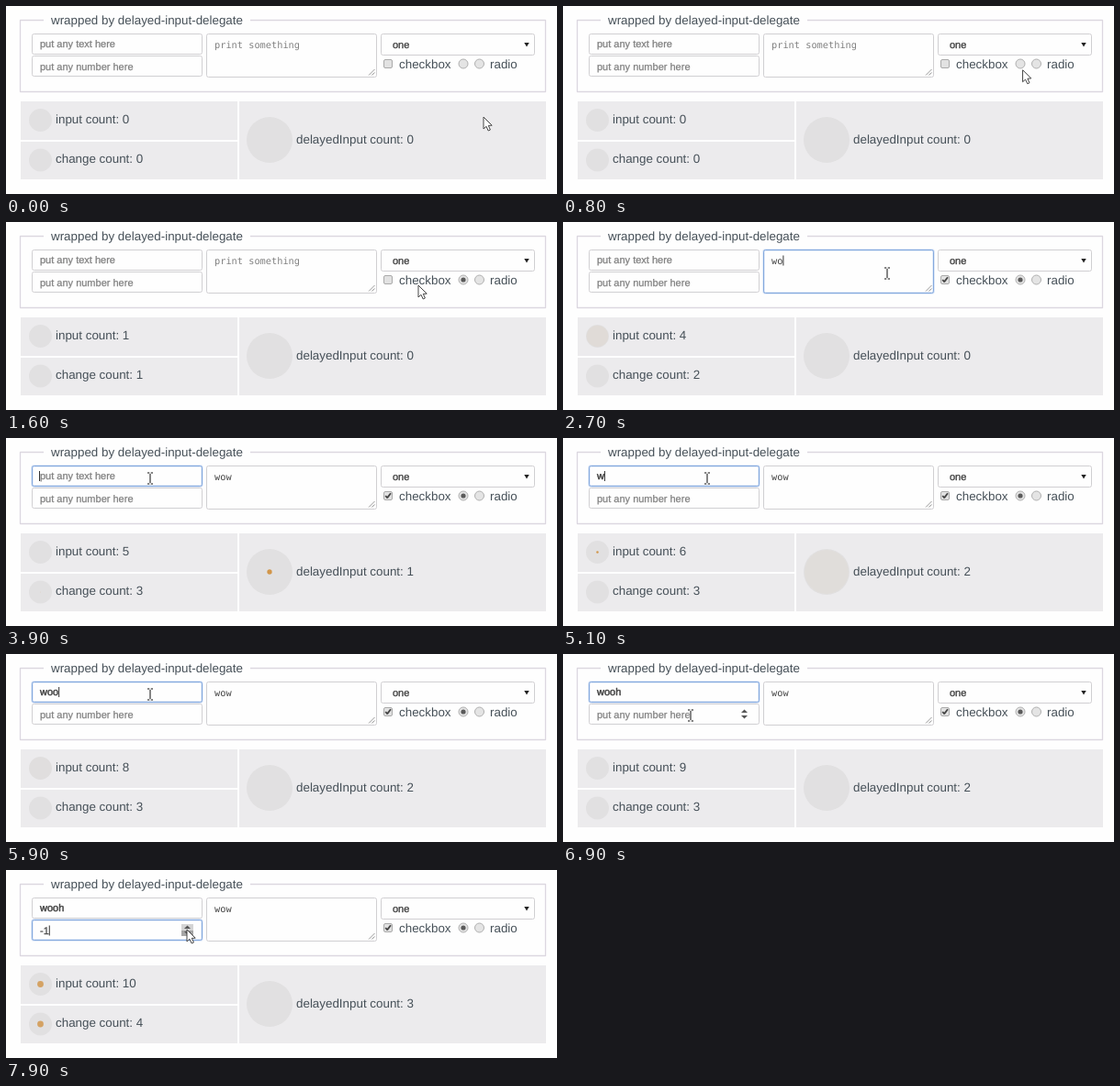
An HTML page with a canvas that plays this animation: 600x205 px, repeating every 8000 ms.

```html
<!DOCTYPE html>
<html lang="en">
<head>
<meta charset="utf-8">
<title>Delayed input delegate</title>
<style>
html, body { margin: 0; width: 100%; height: 100%; overflow: hidden; background: #fefefe; }
canvas { display: block; width: 600px; height: 205px; }
</style>
</head>
<body>
<canvas id="stage"></canvas>
<script>
const LOOP = 8000, W = 600, H = 205;
const SANS = '"Liberation Sans", Arial, sans-serif';
const MONO = '"DejaVu Sans Mono", monospace';
const LABEL = '13.38px ' + SANS, FIELD = '11px ' + SANS, CODE = '10.3px ' + MONO;
const INK = '#465058', HINT = '#808080', TYPED = '#444';

const canvas = document.getElementById('stage');
const ctx = canvas.getContext('2d');
const dpr = window.devicePixelRatio || 1;
canvas.width = W * dpr;
canvas.height = H * dpr;

// Event times in ms
const RADIO = 1080, CHECK = 1850, SPIN = 7825;
const AREA_KEYS = [2230, 2420, 2850];
const TEXT_KEYS = [5060, 5300, 5560, 5950];
const AREA_FOCUS = 2130, TEXT_FOCUS = 3890;
const inputs = [RADIO, CHECK, ...AREA_KEYS, ...TEXT_KEYS, SPIN];
const changes = [RADIO, CHECK, TEXT_FOCUS, SPIN];
const delayed = [3858, 4800, 6960];

// Pointer path: time, x, y
const path = [
  [0, 520, 121], [250, 520, 121], [950, 498, 63], [1200, 498, 63],
  [1600, 449, 69], [1800, 416, 63], [1920, 416, 63], [2110, 353, 56],
  [3250, 353, 56], [3750, 157, 44], [6350, 157, 44], [6750, 139, 67],
  [6980, 139, 67], [7500, 197, 65], [8000, 197, 65]
];

const past = (times, t) => times.filter(x => x <= t);
const smooth = p => p * p * (3 - 2 * p);

function pointer(t) {
  const i = Math.max(1, path.findIndex(k => k[0] > t));
  const [t0, x0, y0] = path[i - 1], [t1, x1, y1] = path[i];
  const p = smooth((t - t0) / (t1 - t0));
  return [x0 + (x1 - x0) * p, y0 + (y1 - y0) * p];
}

function ease(p) {
  // cubic-bezier(.25, .1, .25, 1)
  const curve = (u, a, b) => 3 * u * (1 - u) * (1 - u) * a + 3 * u * u * (1 - u) * b + u * u * u;
  let lo = 0, hi = 1;
  for (let i = 0; i < 16; i++) {
    const mid = (lo + hi) / 2;
    if (curve(mid, 0.25, 0.25) < p) lo = mid; else hi = mid;
  }
  return curve(lo, 0.1, 1);
}

function text(str, x, y, font, color, weight) {
  ctx.font = font;
  ctx.fillStyle = color;
  ctx.fillText(str, x, y);
  if (weight) {
    ctx.strokeStyle = color;
    ctx.lineWidth = weight;
    ctx.strokeText(str, x, y);
  }
  return ctx.measureText(str).width;
}

function poly(points, fill, stroke, width = 1) {
  ctx.beginPath();
  points.forEach(([x, y]) => ctx.lineTo(x, y));
  ctx.closePath();
  if (fill) { ctx.fillStyle = fill; ctx.fill(); }
  if (stroke) { ctx.strokeStyle = stroke; ctx.lineWidth = width; ctx.stroke(); }
}

function disc(x, y, r, fill, stroke) {
  ctx.beginPath();
  ctx.arc(x, y, r, 0, Math.PI * 2);
  ctx.fillStyle = fill;
  ctx.fill();
  if (stroke) { ctx.strokeStyle = stroke; ctx.lineWidth = 1; ctx.stroke(); }
}

function line(x0, y0, x1, y1, color, width = 1) {
  ctx.beginPath();
  ctx.moveTo(x0, y0);
  ctx.lineTo(x1, y1);
  ctx.strokeStyle = color;
  ctx.lineWidth = width;
  ctx.stroke();
}

function box(x, y, w, h, focused) {
  ctx.beginPath();
  ctx.roundRect(x + 0.5, y + 0.5, w - 1, h - 1, 2);
  ctx.fillStyle = '#fefefe';
  ctx.fill();
  if (focused) {
    ctx.strokeStyle = 'rgba(130,170,230,.3)';
    ctx.lineWidth = 2.4;
    ctx.stroke();
  }
  ctx.strokeStyle = focused ? '#84a9dd' : '#d0cfd2';
  ctx.lineWidth = 1;
  ctx.stroke();
}

function caret(x, y, since) {
  if (since % 1000 < 500) line(x + 0.5, y - 9, x + 0.5, y + 2, '#333');
}

function panel(x, y, w, h) {
  ctx.fillStyle = '#ecebed';
  ctx.fillRect(x, y, w, h);
}

function counter(name, times, t, x, y, r, textX, baseline) {
  const fired = past(times, t);
  disc(x, y, r, '#e1e0e1');
  const p = fired.length ? (t - fired[fired.length - 1]) / 400 : 1;
  if (p < 1) {
    const s = ease(p);
    ctx.globalAlpha = Math.min(1, 1.15 * (1 - s));
    disc(x, y, r * s, '#d2964a');
    ctx.globalAlpha = 1;
  }
  text(name + ' count: ' + fired.length, textX, baseline, LABEL, INK);
}

function spinner(pressed) {
  if (pressed) {
    ctx.fillStyle = '#d4d4d4';
    ctx.fillRect(191, 59, 13, 13);
    ctx.fillStyle = '#a6a6a6';
    ctx.fillRect(191, 66, 13, 6);
  }
  poly([[194, 64], [197.5, 60.5], [201, 64]], '#555');
  poly([[194, 67], [197.5, 70.5], [201, 67]], '#555');
}

function drawPointer(x, y) {
  const inField = y > 30 && y < 77 && (x > 28 && x < 190 || x > 218 && x < 403);
  if (inField) {
    const beam = (color, w) => {
      line(x, y - 5, x, y + 5, color, w);
      [-6, 6].forEach(d => {
        line(x - 3, y + d, x - 0.7, y + d, color, w);
        line(x + 0.7, y + d, x + 3, y + d, color, w);
      });
    };
    beam('#fff', 2.6);
    beam('#333', 1.2);
    return;
  }
  const shape = [[0, 0], [0, 13], [3, 10.3], [5.2, 15], [7.4, 14], [5.3, 9.4], [9.2, 9.2]];
  poly(shape.map(([a, b]) => [x + a, y + b]), '#fff', '#444');
}

function fieldset() {
  ctx.beginPath();
  ctx.moveTo(41, 15.5);
  ctx.lineTo(15.5, 15.5);
  ctx.lineTo(15.5, 93.5);
  ctx.lineTo(587.5, 93.5);
  ctx.lineTo(587.5, 15.5);
  ctx.lineTo(266, 15.5);
  ctx.strokeStyle = '#dcd7e0';
  ctx.lineWidth = 1.3;
  ctx.stroke();
  text('wrapped by delayed-input-delegate', 49, 20, LABEL, INK);
}

function form(t, mx, my) {
  const areaOn = t >= AREA_FOCUS && t < TEXT_FOCUS;
  const textOn = t >= TEXT_FOCUS && t < SPIN;
  const numOn = t >= SPIN;
  const typed = 'wooh'.slice(0, past(TEXT_KEYS, t).length);
  const note = 'wow'.slice(0, past(AREA_KEYS, t).length);

  box(28, 30, 186, 23, textOn);
  const tw = text(typed || 'put any text here', 37, 45, FIELD, typed ? TYPED : HINT, typed ? 0.5 : 0.3);
  if (textOn) caret(typed ? 37 + tw : 36, 45, t - Math.max(TEXT_FOCUS, ...past(TEXT_KEYS, t)));

  box(28, 54, 186, 23, numOn);
  const nw = text(numOn ? '-1' : 'put any number here', 37, 69.5, FIELD, numOn ? TYPED : HINT, 0.25);
  if (numOn || mx > 28 && mx < 213 && my > 54 && my < 77) spinner(numOn);
  if (numOn) caret(37 + nw, 69.5, t - SPIN);

  box(218, 30, 186, 48, areaOn);
  const aw = text(note || 'print something', 227, 45.5, CODE, note ? TYPED : HINT);
  if (areaOn) caret(note ? 227 + aw : 226, 45.5, t - Math.max(AREA_FOCUS, ...past(AREA_KEYS, t)));
  line(395, 75.5, 401.5, 69, '#999');
  line(398.5, 75.5, 401.5, 72.5, '#999');

  box(408, 30, 168, 24);
  text('one', 421, 45.5, FIELD, '#3a3a3a', 0.3);
  poly([[564.3, 40], [569.7, 40], [567, 44.5]], '#222');

  ctx.beginPath();
  ctx.roundRect(411.5, 58.5, 9, 9, 1.5);
  ctx.fillStyle = '#e2e2e2';
  ctx.fill();
  ctx.strokeStyle = '#aaa';
  ctx.lineWidth = 1;
  ctx.stroke();
  if (t >= CHECK) {
    line(413.2, 63, 415.4, 65.4, '#444', 1.8);
    line(415, 65.4, 419, 60.2, '#444', 1.8);
  }
  text('checkbox', 428, 68, LABEL, INK);
  disc(498, 63, 5, '#e4e4e4', '#b0b0b0');
  if (t >= RADIO) disc(498, 63, 2.6, '#5a5a5a');
  disc(515.5, 63, 5, '#e4e4e4', '#b0b0b0');
  text('radio', 527, 68, LABEL, INK);
}

function draw(t) {
  const [mx, my] = pointer(t);
  ctx.setTransform(dpr, 0, 0, dpr, 0, 0);
  ctx.fillStyle = '#fefefe';
  ctx.fillRect(0, 0, W, H);
  ctx.lineJoin = 'round';
  ctx.textRendering = 'geometricPrecision';

  fieldset();
  form(t, mx, my);

  panel(16, 104, 236, 42);
  panel(16, 148, 236, 41);
  panel(254, 104, 334, 85);
  counter('input', inputs, t, 37.5, 124.5, 12.5, 54, 128);
  counter('change', changes, t, 37.5, 168, 12.5, 54, 171);
  counter('delayedInput', delayed, t, 287, 146, 25, 316, 150);

  drawPointer(mx, my);
}

const start = performance.now();
function tick() {
  draw((performance.now() - start) % LOOP);
  requestAnimationFrame(tick);
}
tick();
</script>
</body>
</html>
```
